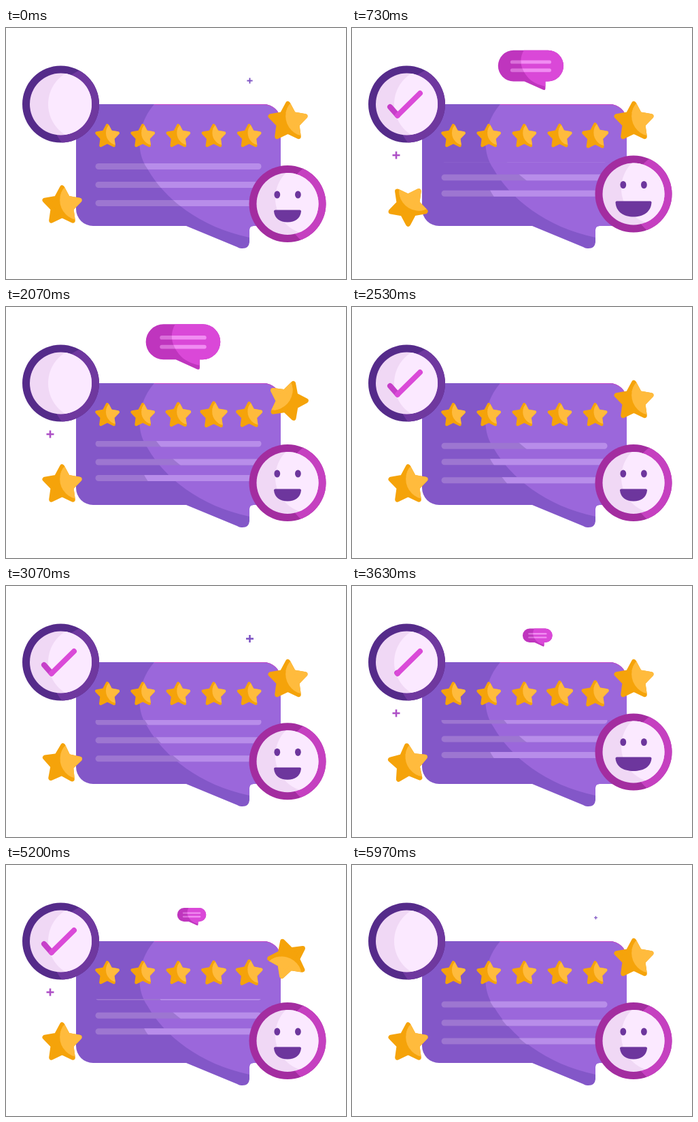
Write an HTML page with a canvas that moves like this. It is 500 px wide and 369 px high and loops after 6010 ms.

```html
<!DOCTYPE html>
<html lang="en">
<head>
<meta charset="utf-8">
<title>Five star review</title>
<style>
html, body { margin: 0; width: 100%; height: 100%; overflow: hidden; background: #fff; }
canvas { display: block; width: 500px; height: 369px; }
</style>
</head>
<body>
<canvas id="stage"></canvas>
<script>
const LOOP = 6010, W = 500, H = 369, TAU = Math.PI * 2;
const stage = document.getElementById('stage');
const dpr = window.devicePixelRatio || 1;
stage.width = W * dpr;
stage.height = H * dpr;
const c = stage.getContext('2d');

const unit = x => Math.min(1, Math.max(0, x));
const ramp = (t, a, b) => unit((t - a) / (b - a));
const smooth = x => x * x * (3 - 2 * x);
const wave = x => (1 - Math.cos(Math.PI * x)) / 2;

// Interpolates rows of [time, value].
function track(t, rows, ease = x => x) {
  if (t <= rows[0][0]) return rows[0][1];
  for (let i = 1; i < rows.length; i++) {
    const [a, from] = rows[i - 1], [b, to] = rows[i];
    if (t <= b) return from + (to - from) * ease((t - a) / (b - a));
  }
  return rows[rows.length - 1][1];
}

function scoped(draw) {
  c.save();
  draw();
  c.restore();
}

function disc(x, y, r, fill) {
  c.fillStyle = fill;
  c.beginPath();
  c.arc(x, y, r, 0, TAU);
  c.fill();
}

function stroke(points, width, color, cap = 'round') {
  c.lineCap = cap;
  c.lineJoin = 'round';
  c.lineWidth = width;
  c.strokeStyle = color;
  c.beginPath();
  points.forEach(([x, y]) => c.lineTo(x, y));
  c.stroke();
}

// Panel

const panel = new Path2D('M128 112H379A25 25 0 0 1 404 137V291H364Q358 291 358 297V315' +
  'Q357 325 346 324Q343 324 340 322L265 291H128A25 25 0 0 1 103 266V137A25 25 0 0 1 128 112Z');
const panelGlow = new Path2D('M218 100V112C190 145 192 185 208 207C232 250 285 293 358 308H420V100Z');

function drawPanel(t) {
  c.fillStyle = '#8357c8';
  c.fill(panel);
  scoped(() => {
    c.clip(panel);
    c.fillStyle = '#9b67db';
    c.fill(panelGlow);
  });
  c.lineWidth = 1;
  c.strokeStyle = '#c64bc9';
  c.stroke(new Path2D('M218 112.5H379A24.5 24.5 0 0 1 403.5 137'));

  const shift = -77.5 * (t % 1500) / 1500;
  scoped(() => {
    c.beginPath();
    c.rect(125, 197, 260, 68);
    c.clip();
    for (let i = 0; i < 6; i++) {
      const y = 203.5 + 27 * (i % 3);
      const bar = [[136, y], [371, y]];
      scoped(() => {
        c.translate(0, shift + (i < 3 ? 0 : 77.5));
        stroke(bar, 9, '#9d76d1');
        c.clip(panelGlow);
        stroke(bar, 9, '#b88dea');
      });
    }
  });
}

// Stars

const starPath = new Path2D();
for (let i = 0; i < 10; i++) {
  const r = i % 2 ? 0.46 : 0.88, a = i * TAU / 10 - TAU / 4;
  starPath.lineTo(r * Math.cos(a), r * Math.sin(a));
}
starPath.closePath();

function paintStar(color) {
  c.fillStyle = c.strokeStyle = color;
  c.lineJoin = 'round';
  c.lineWidth = 0.24;
  c.fill(starPath);
  c.stroke(starPath);
}

function drawStar(x, y, r, deg = 0) {
  scoped(() => {
    c.translate(x, y);
    c.rotate(deg * TAU / 360);
    c.scale(r, r);
    paintStar('#f5a30a');
    c.beginPath();
    c.arc(0.86, -0.28, 0.97, 0, TAU);
    c.clip();
    paintStar('#ffbb3d');
  });
}

function drawRow(t) {
  for (let i = 0; i < 5; i++) {
    const d = unit(Math.abs(t % 1500 - 250 - 100 * i) / 230);
    drawStar(149 + 52.15 * i, 159.5, 18.6 * (1 + 0.13 * (1 - wave(d))));
  }
}

// Small wind-up, then one counter-clockwise turn.
function spin(t, start, turn, end) {
  const u = ramp(t, start, turn);
  return 10 * (1 - (1 - u) * (1 - u)) - 370 * wave(ramp(t, turn, end));
}

// Badges

function badge(x, y, dark, light, ring, glow) {
  disc(x, y, 56.5, dark);
  scoped(() => {
    c.beginPath();
    c.arc(x, y, 56.5, 0, TAU);
    c.clip();
    disc(x + ring[0], y + ring[1], ring[2], light);
  });
  disc(x, y, 45.5, '#f0d8f5');
  scoped(() => {
    c.beginPath();
    c.arc(x, y, 45.5, 0, TAU);
    c.clip();
    disc(x + glow[0], y + glow[1], glow[2], '#fbe9ff');
  });
}

function drawCheck(t) {
  const p = t % 2000;
  const from = smooth(ramp(p, 1500, 1900)), to = smooth(ramp(p, 100, 500));
  if (to <= 0 || from >= 1) return;
  const bend = 0.27;
  const at = u => u < bend
    ? [56 + 11 * u / bend, 116 + 12.5 * u / bend]
    : [67 + 33 * (u - bend) / (1 - bend), 128.5 - 32.5 * (u - bend) / (1 - bend)];
  if (from < bend) stroke([at(from), at(Math.min(to, bend))], 8, '#c63fc9');
  if (to > bend) stroke([at(Math.max(from, bend)), at(to)], 8, '#da4ad8');
}

function drawSmile(p) {
  const y = 258.5 - 14.5 * (wave(ramp(p, 0, 500)) - wave(ramp(p, 1385, 1885)));
  const half = track(p, [[70, 20], [560, 26.5], [1350, 26.5], [1530, 24.5], [1950, 20]], smooth);
  const top = y + track(p, [[70, 9], [630, 7.5], [730, 10.5], [1250, 10.5], [1530, 4.5], [1950, 9]], smooth);
  const tall = track(p, [[70, 18], [630, 20.5], [730, 23], [1250, 23], [1530, 15.5], [1950, 18]], smooth);
  const eye = y + track(p, [[70, -13.5], [630, -14.5], [730, -13.5], [1250, -13.5], [1530, -17], [1950, -13.5]], smooth);

  badge(414, y, '#a32da0', '#c540c0', [63, 2, 67], [35, -8, 53]);
  c.fillStyle = '#6d369d';
  for (const x of [398.8, 429.4]) {
    c.beginPath();
    c.ellipse(x, eye, 4.4, 5.6, 0, 0, TAU);
    c.fill();
  }
  c.beginPath();
  c.moveTo(414 - half + 2, top);
  c.lineTo(414 + half - 2, top);
  c.quadraticCurveTo(414 + half, top, 414 + half, top + 2);
  c.bezierCurveTo(414 + half - 1, top + tall * 0.7, 414 + half * 0.55, top + tall, 414, top + tall);
  c.bezierCurveTo(414 - half * 0.55, top + tall, 414 - half + 1, top + tall * 0.7, 414 - half, top + 2);
  c.quadraticCurveTo(414 - half, top, 414 - half + 2, top);
  c.fill();
}

// Small speech bubble

const bubble = new Path2D('M230.5 24H289.5A26.5 26.5 0 0 1 289.5 77H285V89Q285 93 281 91.5' +
  'L249 77H230.5A26.5 26.5 0 0 1 230.5 24Z');
const bubbleGlow = new Path2D('M248 20V24C239 40 243 56 254 69C261 78 272 83 286 86H320V20Z');

function drawBubble(p) {
  const s = track(p, [[575, 0], [630, 0.385], [680, 0.65], [730, 0.857], [800, 1.06], [870, 1.095],
    [930, 1.06], [1010, 1], [1860, 1], [1900, 1.03], [1975, 1.095], [2030, 1.05], [2070, 0.982],
    [2120, 0.82], [2190, 0.45], [2260, 0]]);
  if (s <= 0) return;
  const bars = color => [44, 58].forEach(y => stroke([[228, y], [292, y]], 6, color));
  scoped(() => {
    c.translate(281, 87);
    c.scale(s, s);
    c.translate(-281, -87);
    c.fillStyle = '#bf35be';
    c.fill(bubble);
    bars('#da70da');
    c.clip(bubble);
    c.clip(bubbleGlow);
    c.fillStyle = '#da48d8';
    c.fillRect(200, 15, 125, 85);
    bars('#f18cf2');
  });
}

// Sparkles

function drawPlus(x, y, color, age, life) {
  if (age >= life) return;
  const s = Math.min(smooth(ramp(age, -40, 110)), smooth(ramp(life - age, 0, 110)));
  const r = 5.5 * s;
  stroke([[x - r, y], [x + r, y]], 2.6 * s, color, 'butt');
  stroke([[x, y - r], [x, y + r]], 2.6 * s, color, 'butt');
}

function render(t) {
  c.setTransform(dpr, 0, 0, dpr, 0, 0);
  c.fillStyle = '#fff';
  c.fillRect(0, 0, W, H);
  const p = t % 3000;

  drawPanel(t);
  drawRow(t);
  drawStar(82.5, 261.5, 30.3, spin(p, 0, 510, 1470));
  drawStar(414.5, 138, 30.3, spin(p, 1550, 1780, 2480));
  badge(80.5, 112, '#552b8a', '#6f389f', [54, 13, 68], [34.5, 0, 53]);
  drawCheck(t);
  drawSmile(p);
  drawBubble(p);
  drawPlus(358.5, 77.5, '#7f55c4', (t + 60) % 1500, 450);
  drawPlus(65, 187, '#ad50c6', (t + 1040) % 1500, 450);
}

function tick() {
  render(performance.now() % LOOP);
  requestAnimationFrame(tick);
}
tick();
</script>
</body>
</html>
```
